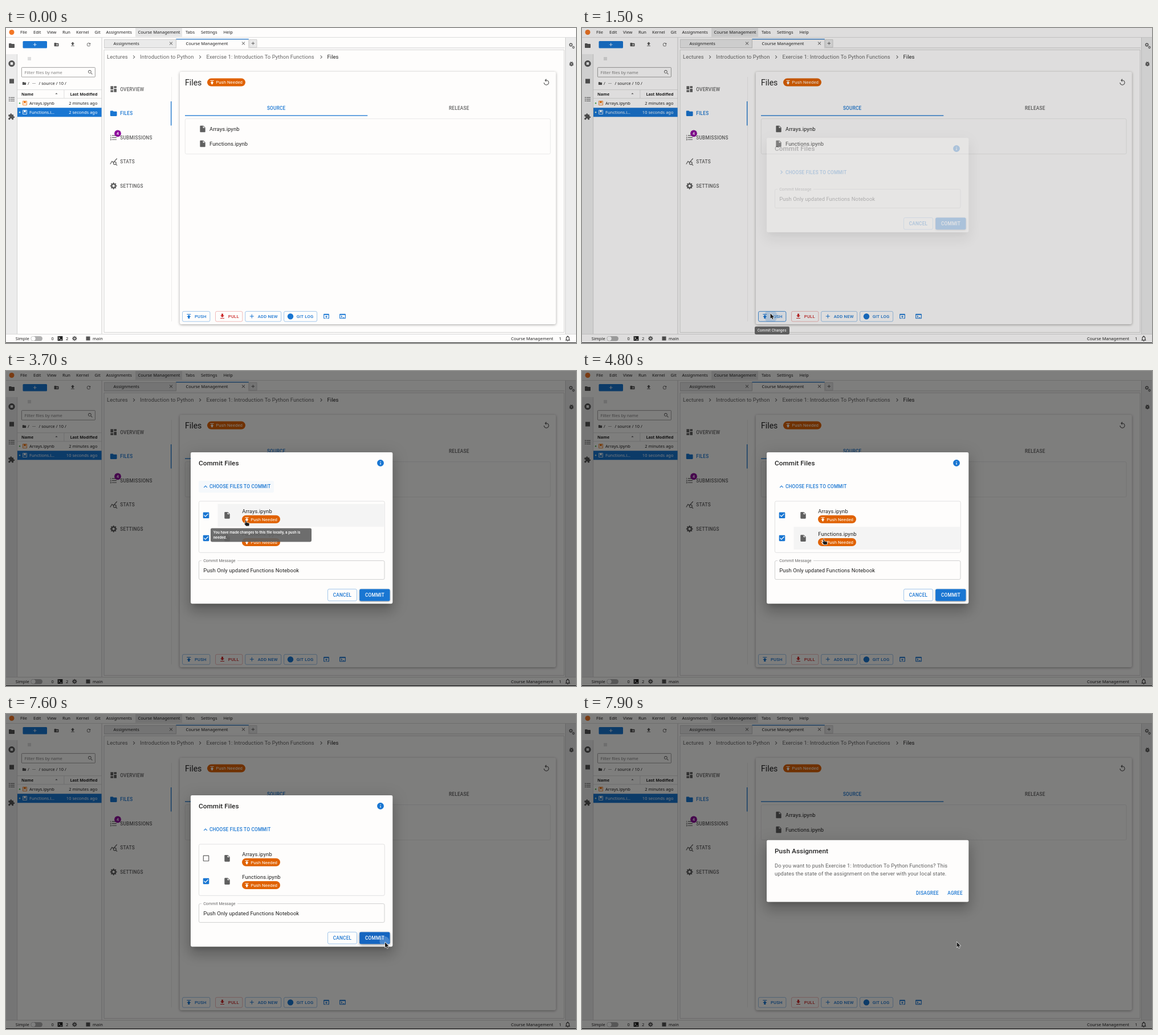
An HTML page with a canvas for the animation above (8 s loop, 1000 px wide and 554 px high).

```html
<!DOCTYPE html>
<html lang="en">
<head>
<meta charset="utf-8">
<title>Commit files</title>
<style>
html, body { margin: 0; width: 100%; height: 100%; overflow: hidden; background: #fff; }
canvas { display: block; }
</style>
</head>
<body>
<canvas id="stage" width="1000" height="554"></canvas>
<script>
const W = 1000, H = 554, LOOP = 8000, STEP = 100;
const screen2d = document.getElementById('stage').getContext('2d');
const layer = document.createElement('canvas');
layer.width = W; layer.height = H;
const layer2d = layer.getContext('2d');
let c = screen2d;

const BLUE = '#1976d2', RED = '#cc2a2a', ORANGE = '#e06202', INK = '#212121', GREY = '#606060', ICON = '#555', PAPER = '#fefdfc';
const UI = '"Noto Sans", "Open Sans", sans-serif', ROBOTO = 'Roboto, sans-serif';

// Icons on a 24 unit grid
const ICONS = {
  folder: 'M10 4H4c-1.1 0-2 .9-2 2v12c0 1.1.9 2 2 2h16c1.1 0 2-.9 2-2V8c0-1.1-.9-2-2-2h-8z',
  newFolder: 'M20 6h-8l-2-2H4c-1.1 0-2 .9-2 2v12c0 1.1.9 2 2 2h16c1.1 0 2-.9 2-2V8c0-1.1-.9-2-2-2zm-1 8h-3v3h-2v-3h-3v-2h3V9h2v3h3z',
  file: 'M6 2c-1.1 0-2 .9-2 2v16c0 1.1.9 2 2 2h12c1.1 0 2-.9 2-2V8l-6-6zm7 7V3.5L18.5 9z',
  dashboard: 'M3 13h8V3H3zm0 8h8v-6H3zm10 0h8V11h-8zm0-18v6h8V3z',
  push: 'M5 4v2h14V4zm0 10h4v6h6v-6h4l-7-7z',
  pull: 'M19 9h-4V3H9v6H5l7 7zM5 18v2h14v-2z',
  upload: 'M5 18v2h14v-2zm0-8h4v6h6v-6h4l-7-7z',
  add: 'M19 13h-6v6h-2v-6H5v-2h6V5h2v6h6z',
  close: 'M19 6.4 17.6 5 12 10.6 6.4 5 5 6.4 10.6 12 5 17.6 6.4 19 12 13.4 17.6 19 19 17.6 13.4 12z',
  replay: 'M12 5V1L7 6l5 5V7c3.3 0 6 2.7 6 6s-2.7 6-6 6-6-2.7-6-6H4c0 4.4 3.6 8 8 8s8-3.6 8-8-3.6-8-8-8z',
  refresh: 'M17.65 6.35C16.2 4.9 14.2 4 12 4c-4.4 0-8 3.6-8 8s3.6 8 8 8c3.7 0 6.8-2.5 7.7-6h-2.1c-.8 2.3-3 4-5.6 4-3.3 0-6-2.7-6-6s2.7-6 6-6c1.7 0 3.1.7 4.2 1.8L13 11h7V4z',
  search: 'M15.5 14h-.8l-.3-.3C15.4 12.6 16 11.1 16 9.5 16 5.9 13.1 3 9.5 3S3 5.9 3 9.5 5.9 16 9.5 16c1.6 0 3.1-.6 4.2-1.6l.3.3v.8l5 5 1.5-1.5zm-6 0C7 14 5 12 5 9.5S7 5 9.5 5 14 7 14 9.5 12 14 9.5 14z',
  right: 'M10 6 8.6 7.4 13.2 12l-4.6 4.6L10 18l6-6z',
  up: 'M12 8l-6 6 1.4 1.4L12 10.8l4.6 4.6L18 14z',
  caret: 'M7 14l5-5 5 5z',
  info: 'M12 2C6.5 2 2 6.5 2 12s4.5 10 10 10 10-4.5 10-10S17.5 2 12 2zm1 15h-2v-6h2zm0-8h-2V7h2z',
  stop: 'M12 2C6.5 2 2 6.5 2 12s4.5 10 10 10 10-4.5 10-10S17.5 2 12 2zM8 8h8v8H8z',
  checked: 'M19 3H5c-1.1 0-2 .9-2 2v14c0 1.1.9 2 2 2h14c1.1 0 2-.9 2-2V5c0-1.1-.9-2-2-2zm-9 14l-5-5 1.4-1.4L10 14.2l7.6-7.6L19 8z',
  unchecked: 'M19 5v14H5V5zm0-2H5c-1.1 0-2 .9-2 2v14c0 1.1.9 2 2 2h14c1.1 0 2-.9 2-2V5c0-1.1-.9-2-2-2z',
  numbered: 'M2 17h2v.5H3v1h1v.5H2v1h3v-4H2zm1-9h1V4H2v1h1zm-1 3h1.8L2 13.1v.9h3v-1H3.2L5 10.9V10H2zm5-6v2h14V5zm0 14h14v-2H7zm0-6h14v-2H7z',
  bullets: 'M2 4h3v3H2zm0 6h3v3H2zm0 6h3v3H2zM7 4.5h15v2H7zm0 6h15v2H7zm0 6h15v2H7z',
  puzzle: 'M20.5 11H19V7c0-1.1-.9-2-2-2h-4V3.5C13 2.1 11.9 1 10.5 1S8 2.1 8 3.5V5H4c-1.1 0-2 .9-2 2v3.8h1.5c1.5 0 2.7 1.2 2.7 2.7s-1.2 2.7-2.7 2.7H2V20c0 1.1.9 2 2 2h3.8v-1.5c0-1.5 1.2-2.7 2.7-2.7s2.7 1.2 2.7 2.7V22H17c1.1 0 2-.9 2-2v-4h1.5c1.4 0 2.5-1.1 2.5-2.5S21.9 11 20.5 11z',
  browser: 'M19 4H5c-1.1 0-2 .9-2 2v12c0 1.1.9 2 2 2h4v-2H5V8h14v10h-4v2h4c1.1 0 2-.9 2-2V6c0-1.1-.9-2-2-2zm-7 6l-4 4h3v6h2v-6h3z',
  terminal: 'M20 4H4c-1.1 0-2 .9-2 2v12c0 1.1.9 2 2 2h16c1.1 0 2-.9 2-2V6c0-1.1-.9-2-2-2zm0 14H4V8h16zm-2-1h-6v-2h6zM7.5 17l-1.4-1.4L8.7 13l-2.6-2.6L7.5 9l4 4z',
  console: 'M2 3h20v18H2zM5 7l4 4-4 4 1.4 1.4L12 11 6.4 5.6zm7 9v2h7v-2z',
  notebook: 'M3 3h18v18H3zM5 5v14h14V5zM8 5h8v10l-4-4-4 4z',
  bug: 'M20 8h-2.8c-.5-.8-1.1-1.4-1.8-2L17 4.4 15.6 3l-2.2 2.2c-.9-.2-1.9-.2-2.8 0L8.4 3 7 4.4 8.6 6c-.7.6-1.3 1.2-1.8 2H4v2h2.1L6 12H4v2h2l.1 2H4v2h2.8c1 1.8 3 3 5.2 3s4.2-1.2 5.2-3H20v-2h-2.1l.1-2h2v-2h-2l-.1-2H20zm-6 8h-4v-2h4zm0-4h-4v-2h4z',
  bell: 'M12 22c1.1 0 2-.9 2-2h-4c0 1.1.9 2 2 2zm6-6v-5c0-3.1-1.6-5.6-4.5-6.3V4c0-2-3-2-3 0v.7C7.6 5.4 6 7.9 6 11v5l-2 2v1h16v-1zm-2 1H8v-6c0-2.5 1.5-4.5 4-4.5s4 2 4 4.5z'
};
for (const k in ICONS) ICONS[k] = new Path2D(ICONS[k]);

const ARROW = new Path2D('M0 0V9.2L2.1 7.2 3.6 10.6 5.1 9.9 3.7 6.7H6.6z');
const HAND = new Path2D('M0 0.6C0-.5 1.5-.5 1.5.6V3.6L5.6 4.4C6.6 4.6 6.9 5.2 6.8 6L6.3 9.4H1.1L-1.6 5.9C-2 5.2-1 4.5-.5 5L0 5.5z');

function icon(name, x, y, size, color) {
  c.save();
  c.translate(x - size / 2, y - size / 2);
  c.scale(size / 24, size / 24);
  c.fillStyle = color;
  c.fill(ICONS[name], 'evenodd');
  c.restore();
}
function rect(x, y, w, h, color) {
  c.fillStyle = color;
  c.fillRect(x, y, w, h);
}
function round(x, y, w, h, r, fill, stroke) {
  c.beginPath();
  c.roundRect(x, y, w, h, r);
  if (fill) { c.fillStyle = fill; c.fill(); }
  if (stroke) { c.strokeStyle = stroke; c.lineWidth = 0.8; c.stroke(); }
}
function disc(x, y, r, color) {
  c.beginPath();
  c.arc(x, y, r, 0, 7);
  c.fillStyle = color;
  c.fill();
}
function gear(x, y, r, hole, color) {
  c.beginPath();
  for (let i = 0; i < 32; i++) {
    const a = (i - 0.5) * Math.PI / 16, d = i % 4 < 2 ? r : r * 0.76;
    c.lineTo(x + d * Math.cos(a), y + d * Math.sin(a));
  }
  c.closePath();
  c.moveTo(x + hole, y);
  c.arc(x, y, hole, 0, 7);
  c.fillStyle = color;
  c.fill('evenodd');
}
// y is the middle of the capitals
function write(s, x, y, size, color, weight, family, spacing, align) {
  c.font = `${weight} ${size}px ${family}`;
  c.letterSpacing = spacing * size + 'px';
  c.textAlign = align;
  c.fillStyle = color;
  c.fillText(s, x, y + size * 0.356);
}
const ui = (s, x, y, color = INK, align = 'left') => write(s, x, y, 7.5, color, 400, UI, 0, align);
const body = (s, x, y, color = INK, size = 9.4, weight = 400) => write(s, x, y, size, color, weight, ROBOTO, 0.0094, 'left');
const caps = (s, x, y, color, size = 8.23, align = 'left') => write(s, x, y, size, color, 500, ROBOTO, 0.0286, align);

function chip(x, y) {
  round(x, y, 67, 14, 7, ORANGE);
  icon('push', x + 8.5, y + 7, 10.5, '#fff');
  body('Push Needed', x + 15.3, y + 7, '#fff', 7.75);
}
function button(x, y, w, h, edge, fill) {
  round(x, y, w, h, 2.4, fill, edge);
}
function tooltip(x, y, w, lines) {
  round(x, y, w, 4 + lines.length * 10, 2.4, 'rgba(97,97,97,.92)');
  lines.forEach((s, i) => body(s, x + 4.7, y + 7 + i * 9.7, '#fff', 6.47, 500));
}
function ripple(x, y, r, color, box) {
  c.save();
  c.beginPath();
  c.roundRect(...box, 2.4);
  c.clip();
  disc(x, y, r, color);
  c.restore();
}

const clamp = v => Math.max(0, Math.min(1, v));
function ramp(t, a, b) {
  const p = clamp((t - a) / (b - a));
  return p * p * (3 - 2 * p);
}

function drawFrame() {
  rect(0, 0, W, H, PAPER);
  rect(0, 16, W, 1, '#dcdcdc');
  rect(0, 46, 19.5, 492, '#ececec');
  rect(19.3, 46, 0.8, 492, '#c8c8c8');
  rect(981.5, 17, 18.5, 521, '#ececec');
  rect(981, 17, 0.8, 521, '#c8c8c8');
  rect(167.6, 17, 0.9, 521, '#c8c8c8');
  rect(0, 538, W, 0.8, '#d0d0d0');
  rect(0, 553, W, 1, '#222');

  disc(10, 7.5, 4.5, '#f37726');
  rect(227, 0, 82, 15.5, '#e6e6e6');
  [['File', 25], ['Edit', 48], ['View', 72], ['Run', 99], ['Kernel', 123], ['Git', 155.5], ['Assignments', 175.5],
   ['Course Management', 231.5], ['Tabs', 315], ['Settings', 342], ['Help', 381.5]].forEach(([s, x]) => ui(s, x, 7.7));

  icon('folder', 10, 31, 12, ICON);
  icon('stop', 10, 62.5, 13.5, ICON);
  rect(6, 89.5, 8, 8, ICON);
  icon('bullets', 10, 125.5, 12, ICON);
  icon('puzzle', 9.5, 156, 12.5, ICON);
  gear(991, 29.5, 3.4, 1.4, ICON);
  gear(995.5, 34, 2.4, 1, ICON);
  icon('bug', 992, 63, 11, ICON);
}

function drawBrowser(t) {
  round(29.5, 23, 42.5, 12.5, 1.5, BLUE);
  icon('add', 50.7, 29.2, 10, '#fff');
  icon('newFolder', 88.5, 29.2, 9.5, ICON);
  icon('upload', 117, 28.5, 10.5, ICON);
  icon('refresh', 145, 29.2, 9.5, ICON);
  rect(38, 51, 6, 6, '#dedede');
  round(27.4, 69.4, 129, 16.8, 1, PAPER, '#8a8a8a');
  ui('Filter files by name', 32.5, 78, '#808080');
  icon('search', 148, 78, 10.5, ICON);

  icon('folder', 32, 97.5, 7.5, ICON);
  ui('/', 38, 97.5);
  ui('···', 46, 97.5);
  ui('/ source / 10 /', 57.5, 97.5);

  rect(20, 108.3, 148, 0.8, '#d5d5d5');
  rect(20, 123.4, 148, 0.8, '#d5d5d5');
  rect(101.5, 109, 0.8, 14.5, '#d5d5d5');
  write('Name', 27, 116.3, 7.1, INK, 600, UI, 0, 'left');
  write('Last Modified', 160.5, 116.3, 7.1, INK, 600, UI, 0, 'right');
  icon('caret', 88.5, 115.5, 10, ICON);

  rect(20, 140.3, 147.6, 16, BLUE);
  disc(24, 132.3, 1.2, '#4caf50');
  disc(24, 148.3, 1.2, '#d6ecd6');
  icon('notebook', 33, 132, 10, '#ef6c00');
  icon('notebook', 33, 148, 10, '#fff');
  ui('Arrays.ipynb', 41, 132);
  ui('2 minutes ago', 160.5, 132, INK, 'right');
  ui('Functions.i…', 41, 148, '#fff');
  ui(t < 1000 ? '2 seconds ago' : '10 seconds ago', 160.5, 148, '#fff', 'right');
}

function drawTabs() {
  rect(172, 34.6, 808, 0.8, '#c4c4c4');
  round(172.4, 20.2, 126, 14.6, 0, '#eaeaea', '#c4c4c4');
  round(298.6, 20.2, 127, 14.6, 0, PAPER, '#c4c4c4');
  rect(299, 33, 126.2, 2.8, PAPER);
  rect(298.4, 19, 127.4, 1.1, BLUE);
  round(427, 20.4, 13, 13.6, 0, '#eaeaea', '#c4c4c4');
  ui('Assignments', 188.5, 27);
  ui('Course Management', 315.5, 27);
  icon('close', 289.5, 27, 9.5, ICON);
  icon('close', 416.5, 27, 9.5, ICON);
  icon('add', 433.3, 27, 9.5, ICON);
  round(172, 38.4, 807.2, 497, 0, PAPER, '#c8c8c8');
}

function drawCourse() {
  const crumb = '#666';
  body('Lectures', 177, 51, crumb);
  body('Introduction to Python', 235, 51, crumb);
  body('Exercise 1: Introduction To Python Functions', 351.5, 51, crumb);
  body('Files', 563.5, 51);
  [224.5, 340.5, 553].forEach(x => icon('right', x, 51, 12, crumb));

  rect(290, 86, 0.7, 430, '#e4e4e4');
  rect(289, 129, 1.3, 42.5, BLUE);
  ['OVERVIEW', 'FILES', 'SUBMISSIONS', 'STATS', 'SETTINGS'].forEach((s, i) =>
    caps(s, 200.3, 107.7 + i * 42.55, i === 1 ? BLUE : GREY));
  icon('dashboard', 188.7, 107.5, 14.1, GREY);
  icon('folder', 188.7, 150.2, 14.1, BLUE);
  icon('numbered', 188.7, 192.7, 14.1, GREY);
  disc(196, 185.5, 5.9, '#8e109c');
  write('4', 196, 185.6, 7, '#fff', 500, ROBOTO, 0, 'center');
  c.strokeStyle = GREY;
  c.lineWidth = 1.2;
  c.beginPath();
  c.moveTo(182.8, 239.5); c.lineTo(186, 234.5); c.lineTo(188.5, 236.5); c.lineTo(194.7, 229.5);
  c.moveTo(193.2, 237.7); c.arc(190.8, 237.7, 2.4, 0, 7);
  c.moveTo(192.5, 239.4); c.lineTo(195, 241.8);
  c.stroke();
  gear(188.7, 277.7, 6, 2.1, GREY);
}

function drawCard(t) {
  c.save();
  c.shadowColor = 'rgba(0,0,0,.36)';
  c.shadowBlur = 4;
  c.shadowOffsetY = 1;
  round(304.8, 77, 660, 444, 2.4, PAPER);
  c.restore();
  write('Files', 314, 96, 14.1, INK, 400, ROBOTO, 0, 'left');
  chip(353, 88.6);
  icon('replay', 948, 95.5, 14, GREY);
  caps('SOURCE', 474.2, 140.8, BLUE, 8.23, 'center');
  caps('RELEASE', 794.8, 140.8, GREY, 8.23, 'center');
  rect(314, 153.4, 320.3, 1.3, BLUE);
  round(314.3, 159.6, 640.8, 62, 2.4, null, '#e4e4e4');
  ['Arrays.ipynb', 'Functions.ipynb'].forEach((s, i) => {
    icon('file', 345, 177.5 + i * 26, 14, GREY);
    body(s, 357, 177.8 + i * 26);
  });

  const edge = 'rgba(25,118,210,.5)', hover = t >= 600 && t < 1600;
  const box = [309.5, 498.4, 48.4, 17.8];
  button(...box, hover ? BLUE : edge, hover ? 'rgba(25,118,210,.05)' : null);
  button(367.5, 498.4, 47.4, 17.8, 'rgba(211,47,47,.4)');
  button(419.7, 498.4, 63, 17.8, edge);
  button(487.6, 498.4, 58, 17.8, edge);
  icon('push', 320.8, 507, 12, BLUE);
  caps('PUSH', 331, 507.3, BLUE, 7.64);
  icon('pull', 379.5, 507, 12, RED);
  caps('PULL', 389.8, 507.3, RED, 7.64);
  icon('add', 431.3, 507, 12, BLUE);
  caps('ADD NEW', 441.8, 507.3, BLUE, 7.64);
  disc(499, 507.2, 5.2, BLUE);
  caps('GIT LOG', 509.7, 507.3, BLUE, 7.64);
  icon('browser', 562, 507, 13, BLUE);
  icon('terminal', 590.5, 507, 13, BLUE);

  if (t >= 1400 && t < 1700)
    ripple(331, 507, 5 + 13 * ramp(t, 1350, 1650), 'rgba(25,118,210,.2)', box);
  if (hover) tooltip(303, 525, 61, ['Commit Changes']);
}

function drawStatus() {
  ui('Simple', 16.8, 546.5);
  round(43.5, 542, 20.5, 8.4, 4.2, '#b0b0b0');
  disc(48, 546.2, 3.7, '#fff');
  ui('0', 79.5, 546.5);
  icon('console', 95, 546, 10.5, INK);
  ui('2', 105, 546.5);
  gear(120.3, 546, 4.2, 1.6, ICON);
  disc(120.3, 546, 0.8, ICON);
  rect(140.5, 542.5, 7, 7, ICON);
  ui('main', 152, 546.5);
  ui('Course Management', 960, 546.5, INK, 'right');
  ui('1', 970, 546.5);
  icon('bell', 985.5, 546, 12, INK);
}

// Paper with a three-part elevation shadow
function paper(y, h) {
  const x = 324, w = 354.3, far = 3000;
  [[6.5, 9, -4, 0.2], [14, 22, 1.8, 0.14], [5.3, 27, 4.7, 0.12]].forEach(([dy, blur, grow, alpha]) => {
    c.save();
    c.shadowColor = `rgba(0,0,0,${alpha})`;
    c.shadowBlur = blur;
    c.shadowOffsetX = far;
    c.shadowOffsetY = dy;
    round(x - far - grow, y - grow, w + 2 * grow, h + 2 * grow, 2.4, '#000');
    c.restore();
  });
  round(x, y, w, h, 2.4, PAPER);
}
const title = (s, y) => write(s, 338, y, 11.76, INK, 500, ROBOTO, 0.0075, 'left');

function drawFileRow(name, y, checked, hovered) {
  if (hovered) rect(371.5, y - 20, 292.2, 40, '#f4f4f4');
  icon(checked ? 'checked' : 'unchecked', 351, y, 14.1, checked ? BLUE : GREY);
  icon('file', 388, y, 14.1, GREY);
  body(name, 414.3, y - 7);
  chip(414, y);
}

function commitDialog(t) {
  const open = ramp(t, 3050, 3400);
  const top = 193.2 - 50.2 * open, bottom = 359.2 + 50 * open;
  paper(top, bottom - top);
  title('Commit Files', top + 18.8);
  icon('info', 657, top + 18.8, 14.1, BLUE);
  const choose = top + 60.4;
  if (t >= 2900 && t < 3800) round(338, choose - 10.5, 132, 21, 2.4, 'rgba(25,118,210,.04)');
  icon(open > 0 ? 'up' : 'right', 350, choose, 13, BLUE);
  caps('CHOOSE FILES TO COMMIT', 356.9, choose, BLUE);

  const field = bottom - 75.6;
  if (open > 0) {
    c.save();
    c.beginPath();
    c.rect(324, top + 72, 354, Math.max(0, field - 8 - top - 72));
    c.clip();
    round(338.4, top + 86, 325.8, 90.3, 2.4, null, '#dadada');
    const onFirst = t >= 3600 && t < 4700, onSecond = t >= 4700 && t < 5400;
    drawFileRow('Arrays.ipynb', top + 110.8, t < 6000, onFirst);
    drawFileRow('Functions.ipynb', top + 151, true, onSecond);
    if (t >= 5600 && t < 6300) disc(351, top + 110.8, 11, 'rgba(25,118,210,.05)');
    c.restore();
  }

  const overField = t >= 2100 && t < 2800;
  round(338.4, field, 325.6, 33, 2.4, null, overField ? '#222' : '#c4c4c4');
  rect(343, field - 1, 63, 2.5, PAPER);
  body('Commit Message', 346.2, field - 0.4, '#666', 7.06);
  body('Push Only updated Functions Notebook', 346.3, field + 16.6);

  const y = bottom - 25.6, hot = t >= 6600;
  const box = [620.2, y - 0.2, 53.3, 21.2];
  button(564.5, y, 51, 20.6, 'rgba(25,118,210,.5)');
  caps('CANCEL', 590, y + 10.4, BLUE, 8.23, 'center');
  c.save();
  c.shadowColor = 'rgba(0,0,0,.4)';
  c.shadowBlur = hot ? 5 : 3;
  c.shadowOffsetY = hot ? 1.6 : 1;
  round(...box, 2.4, hot ? '#1565c0' : BLUE);
  c.restore();
  if (t >= 7500) ripple(664, y + 16, 4 + 12 * ramp(t, 7450, 7800), 'rgba(255,255,255,.22)', box);
  caps('COMMIT', 647, y + 10.4, '#fff', 8.23, 'center');

  const hint = ['You have made changes to this file locally, a push is', 'needed.'];
  if (t >= 3600 && t < 4700) tooltip(359, 276.4, 177, hint);
  if (t >= 4900 && t < 5400) tooltip(359, 316.6, 177, hint);
}

function pushDialog() {
  paper(221.8, 108.8);
  title('Push Assignment', 240.6);
  body('Do you want to push Exercise 1: Introduction To Python Functions? This', 338, 267, GREY);
  body('updates the state of the assignment on the server with your local state.', 338, 281, GREY);
  caps('DISAGREE', 586, 315.3, BLUE);
  caps('AGREE', 641.3, 315.3, BLUE);
}

function modal(alpha, draw, t) {
  if (alpha <= 0) return;
  rect(0, 0, W, H, `rgba(0,0,0,${0.5 * alpha})`);
  c = layer2d;
  c.clearRect(0, 0, W, H);
  draw(t);
  c = screen2d;
  c.globalAlpha = alpha;
  c.drawImage(layer, 0, 0);
  c.globalAlpha = 1;
}

// Pointer stops: time, x, y
const TRAIL = [
  [300, 409, 508], [800, 330.5, 502], [1600, 330.5, 502], [2400, 522.5, 302], [2600, 522.5, 302],
  [3000, 432, 252], [3300, 432, 252], [3700, 420, 263], [4500, 420, 263], [4900, 424, 302],
  [5200, 424, 302], [5700, 353.5, 255], [6100, 353.5, 255], [6700, 662, 399], [7000, 662, 399],
  [7100, 665, 401.5], [7600, 665, 401.5], [7800, 657.5, 401], [8000, 657.5, 401]
];
function drawPointer(t) {
  if (t < 300) return;
  const i = TRAIL.findIndex(p => p[0] > t);
  const [t0, x0, y0] = TRAIL[i - 1], [t1, x1, y1] = TRAIL[i];
  const p = ramp(t, t0, t1);
  c.save();
  c.translate(x0 + (x1 - x0) * p, y0 + (y1 - y0) * p);
  if (t >= 2100 && t < 2800) {
    c.strokeStyle = '#222';
    c.lineWidth = 0.9;
    c.beginPath();
    c.moveTo(-2.4, -4.5); c.lineTo(2.4, -4.5);
    c.moveTo(0, -4.5); c.lineTo(0, 4.5);
    c.moveTo(-2.4, 4.5); c.lineTo(2.4, 4.5);
    c.stroke();
  } else {
    const shape = t >= 3500 && t < 6300 ? HAND : ARROW;
    c.lineWidth = 1.2;
    c.lineJoin = 'round';
    c.strokeStyle = '#fff';
    c.stroke(shape);
    c.fillStyle = '#1c1c1c';
    c.fill(shape);
  }
  c.restore();
}

function render(t) {
  drawFrame();
  drawBrowser(t);
  drawTabs();
  drawCourse();
  drawCard(t);
  drawStatus();
  modal(ramp(t, 1425, 1655) * (1 - ramp(t, 7610, 7800)), commitDialog, t);
  modal(ramp(t, 7650, 7875), pushDialog, t);
  drawPointer(t);
}

const start = performance.now();
let shown = -1;
function tick() {
  const now = Math.max(0, performance.now() - start) % LOOP;
  const t = Math.floor(now / STEP) * STEP;
  if (t !== shown) render(shown = t);
  requestAnimationFrame(tick);
}
tick();
</script>
</body>
</html>
```
